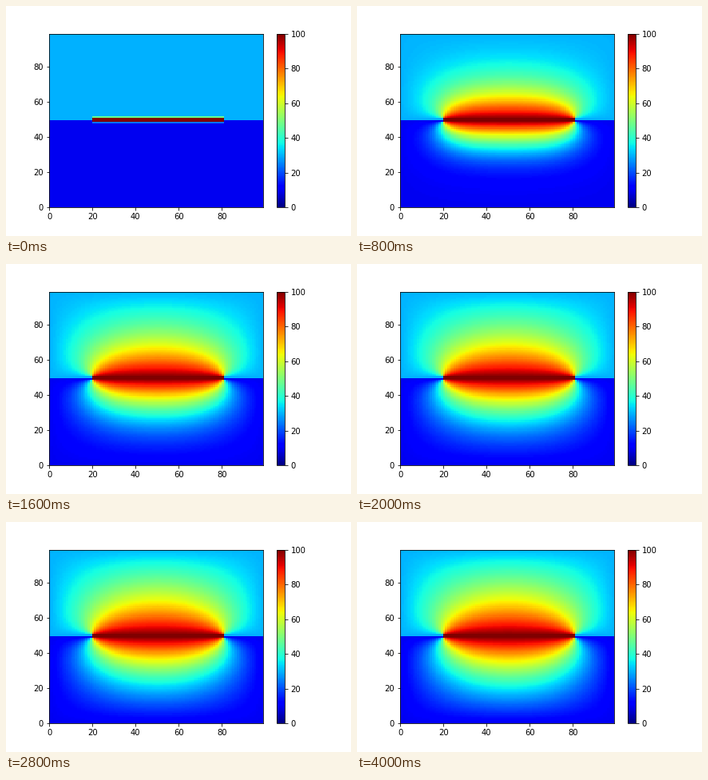
Recreate the animation shown at these times as a matplotlib script. Size 432 by 288 pixels, loop 4.2 s.

```python
import matplotlib.pyplot as plt
import numpy as np
from matplotlib.animation import FuncAnimation

SIZE = 100
FRAMES, INTERVAL = 21, 200
STEPS_PER_FRAME = 200
PLATE = slice(20, 81)
HOT, AIR, WATER = 100, 30, 10
AIR_RATE, WATER_RATE = 0.25, 0.15

plt.rcParams.update({"font.family": "DejaVu Sans", "font.size": 10,
                     "pcolormesh.snap": False})


def start_layer(temperature, plate_row):
    layer = np.full((SIZE // 2, SIZE), float(temperature))
    layer[plate_row, PLATE] = HOT
    return layer


def diffuse(layer, rate):
    """One explicit heat step; the outer cells keep their temperature."""
    core = layer[1:-1, 1:-1]
    core += rate * (layer[2:, 1:-1] + layer[:-2, 1:-1]
                    + layer[1:-1, 2:] + layer[1:-1, :-2] - 4 * core)


def simulate():
    water = start_layer(WATER, -1)
    air = start_layer(AIR, 0)
    fields = []
    for step in range((FRAMES - 1) * STEPS_PER_FRAME + 1):
        diffuse(water, WATER_RATE)
        diffuse(air, AIR_RATE)
        if step % STEPS_PER_FRAME == 0:
            fields.append(np.vstack([water, air])[:-1, :-1])
    return fields


fields = simulate()

fig, ax = plt.subplots(figsize=(6, 4), dpi=72)
fig.subplots_adjust(left=0.125, right=0.9, bottom=0.125, top=0.88)
edges = np.arange(SIZE)
mesh = ax.pcolormesh(edges, edges, fields[0], cmap="jet", vmin=0, vmax=HOT)
ax.set_xticks(range(0, 81, 20))
ax.set_yticks(range(0, 81, 20))
fig.colorbar(mesh, ax=ax, ticks=range(0, 101, 20))


def update(frame):
    mesh.set_array(fields[frame])
    return [mesh]


anim = FuncAnimation(fig, update, frames=FRAMES, interval=INTERVAL,
                     repeat=True, repeat_delay=0)
plt.show()
```
